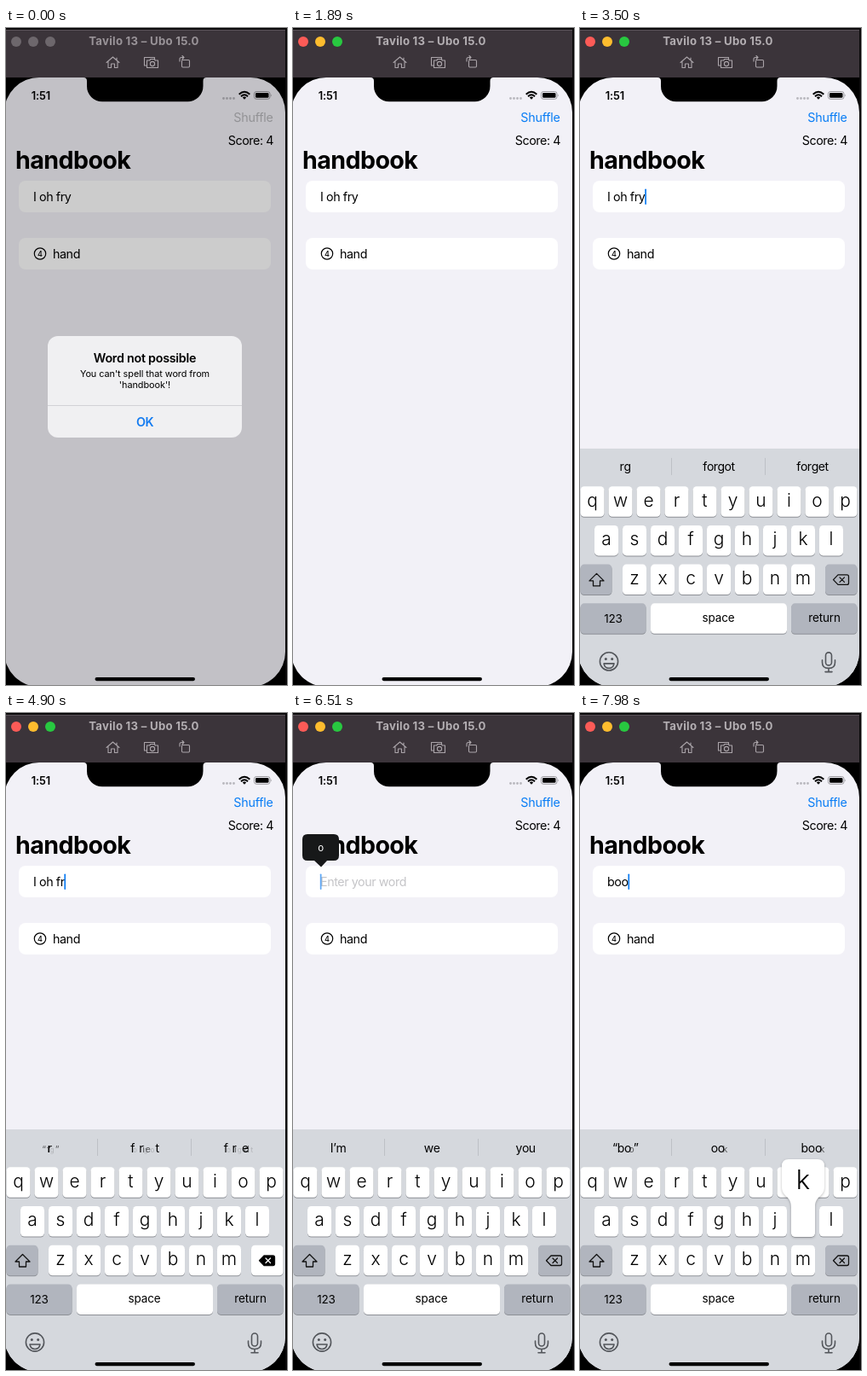
An HTML page that plays this animation: 330 by 770 pixels, repeating every 8 s.

```html
<!DOCTYPE html>
<html lang="en">
<head>
<meta charset="utf-8">
<title>Word game</title>
<style>
html, body { margin: 0; width: 100%; height: 100%; overflow: hidden; background: #0b0a0b; }
svg { display: block; width: 330px; height: 770px; }
text { font-family: Inter, "Liberation Sans", sans-serif; font-size: 14.3px; letter-spacing: -.03em; white-space: pre; }
.mid { text-anchor: middle; }
.end { text-anchor: end; }
.line { fill: none; stroke-linecap: round; stroke-linejoin: round; }
.key { font-size: 21px; font-weight: 300; letter-spacing: 0; }
.note { font-size: 10.9px; letter-spacing: -.006em; }
</style>
</head>
<body>
<svg viewBox="0 0 330 770">
  <defs><clipPath id="screen"><rect x="-2" y="58" width="330" height="714" rx="41"/></clipPath></defs>

  <rect width="330" height="770" fill="#0b0a0b"/>
  <rect y="2" width="328" height="56" fill="#3b343a"/>
  <path d="M0 2.5H328" stroke="#5b545a"/>
  <rect y="58" width="328" height="712"/>
  <g id="lights"><circle cx="12" cy="16" r="6"/><circle cx="32" cy="16" r="6"/><circle cx="52" cy="16" r="6"/></g>
  <text id="caption" class="mid" x="162" y="20" style="font-size:13.2px;font-weight:700;letter-spacing:.02em">Tavilo 13 – Ubo 15.0</text>
  <g class="line" stroke="#aaa4a9" stroke-width="1.1">
    <path d="M118 40.5L125.5 34L133 40.5M120 39.5V46.5H123.5V42H127.5V46.5H131V39.5M130 35V37.5"/>
    <path d="M165 44H162.5V34.5H174.5V36.5M165.5 38H168.5L170 36.5H174L175.5 38H178.5V46.5H165.5Z"/>
    <circle cx="172" cy="42" r="2.6"/>
    <rect x="206.5" y="37.5" width="9" height="8.5" rx="1.2"/>
    <path d="M204 39V36.5Q204 34.5 206 34.5H209M207 32.5L209 34.5L207 36.5"/>
  </g>

  <g clip-path="url(#screen)">
    <rect x="-2" y="58" width="330" height="714" fill="#f2f1f7"/>
    <text x="29.7" y="83.5" style="font-size:12.8px;font-weight:600;letter-spacing:-.01em">1:51</text>
    <g fill="#b9b8be"><circle cx="255.5" cy="82.5" r="1.4"/><circle cx="259.5" cy="82.5" r="1.4"/><circle cx="263.5" cy="82.5" r="1.4"/><circle cx="267.5" cy="82.5" r="1.4"/></g>
    <path d="M273.7 77.8Q280 71.8 286.3 77.8M276 80.2Q280 76.4 284 80.2" fill="none" stroke="#000" stroke-width="2"/>
    <path d="M277.8 81.5Q280 79.7 282.2 81.5L280 83.8Z"/>
    <rect x="291.5" y="74.5" width="18.5" height="8.8" rx="2.6" fill="none" stroke="#99989d"/>
    <rect x="293" y="76" width="15.5" height="5.8" rx="1.4"/>
    <path d="M311.3 77.4Q313 79 311.3 80.6Z" fill="#99989d"/>
    <text id="shuffle" class="end" x="313.7" y="109.5" style="letter-spacing:-.015em">Shuffle</text>
    <text class="end" x="314" y="137">Score: 4</text>
    <text x="11" y="165.3" style="font-size:28.6px;font-weight:700;letter-spacing:-.02em">handbook</text>
    <rect x="15" y="179" width="296" height="37" rx="8" fill="#fff"/>
    <rect x="15" y="246" width="296" height="37" rx="8" fill="#fff"/>
    <text id="entry" x="32" y="203"></text>
    <rect id="caret" y="188.5" width="1.7" height="18.5" rx=".8" fill="#0b7bf2"/>
    <circle cx="40" cy="264.5" r="6.7" fill="none" stroke="#000" stroke-width="1.2"/>
    <text class="mid" x="40" y="267.8" style="font-size:9px;font-weight:500;letter-spacing:0">4</text>
    <text x="55" y="269.8">hand</text>

    <g id="bubble">
      <path d="M17 142H48Q54 142 54 148V167Q54 173 48 173H40L33 180.5L25 173H17Q11 173 11 167V148Q11 142 17 142Z" fill="#171819"/>
      <text class="mid" x="32.5" y="162" fill="#fff" style="font-size:11.5px">o</text>
    </g>

    <g id="keyboard">
      <rect x="-2" width="330" height="290" fill="#d5d8dd"/>
      <path d="M107.5 11V31M217.5 11V31" stroke="#bdc0c6"/>
      <g id="words"></g>
      <g id="keys"></g>
      <g class="line" stroke="#53565b" stroke-width="1.6">
        <circle cx="34" cy="249.5" r="10.6"/>
        <path d="M28 252H40Q39 257.5 34 257.5T28 252Z"/>
        <rect x="288.5" y="239" width="7" height="15" rx="3.5"/>
        <path d="M284.5 248V250.5Q284.5 257.5 292 257.5T299.5 250.5V248M292 257.5V261.5M288 261.7H296"/>
      </g>
      <g fill="#53565b"><circle cx="30.3" cy="246.5" r="1.5"/><circle cx="37.7" cy="246.5" r="1.5"/></g>
      <g id="popup" style="filter:drop-shadow(0 1px 1.5px #0004)"><path fill="#fff"/><text class="mid key" style="font-size:31px"></text></g>
    </g>

    <rect id="dim" x="-2" y="58" width="330" height="714"/>
    <g id="alert">
      <rect x="49" y="361" width="228" height="119" rx="12" fill="#f0f0f2"/>
      <path d="M49 442.5H277" stroke="#d2d2d6"/>
      <text class="mid" x="163" y="392" style="font-weight:600;letter-spacing:-.018em">Word not possible</text>
      <text class="mid note" x="163" y="409">You can't spell that word from</text>
      <text class="mid note" x="163" y="422">'handbook'!</text>
      <text class="mid" x="163" y="466.8" fill="#137bf0" style="font-weight:600">OK</text>
    </g>
    <path d="M91 58A4 4 0 0 1 95 62V68A18 18 0 0 0 113 86.3H213A18 18 0 0 0 231.5 68V62A4 4 0 0 1 235.5 58Z"/>
    <rect x="104.5" y="761" width="117.5" height="4.2" rx="2.1"/>
  </g>
</svg>
<script>
const $ = id => document.getElementById(id);
const clamp = v => Math.min(1, Math.max(0, v));
const ramp = (t, from, to) => clamp((t - from) / (to - from));
const LOOP = 8000, STEP = 70;

const edits = [
  [0, 'I oh fry'], [4760, 'I oh fr'], [5040, 'I oh f'], [5180, 'I oh '], [5320, 'I oh'], [5460, 'I o'],
  [5670, 'I '], [5740, 'I'], [5880, ''], [6930, 'b'], [7210, 'bo'], [7840, 'boo']
];
const suggestions = [
  [0, ['rg', 'forgot', 'forget']],
  [4760, ['“fr”', 'friet', 'fried']],
  [5320, ['', '', '']],
  [5880, ['I’m', 'we', 'you']],
  [6930, ['“b”', 'be', 'but']],
  [7210, ['“bo”', 'oo', 'boo']],
  [7840, ['“boo”', 'ook', 'book']]
];
const presses = [['b', 6790, 6930], ['o', 7140, 7280], ['o', 7700, 7840], ['k', 7910, 8000]];
const lastIndex = (list, t) => list.findLastIndex(item => item[0] <= t);

// Keyboard
const GREY = '#b1b5be', KEY_HEIGHT = 35.5;
const rowTop = row => 44.3 + 45.7 * row;
const keys = {};
const cap = (x, row, w, fill, id = '') =>
  `<rect x="${x}" y="${rowTop(row) + 1}" width="${w}" height="${KEY_HEIGHT}" rx="4.5" fill="#8d9096"/>
   <rect id="${id}" x="${x}" y="${rowTop(row)}" width="${w}" height="${KEY_HEIGHT}" rx="4.5" fill="${fill}"/>`;
const label = (x, y, word) => `<text class="mid" x="${x}" y="${y}" style="font-size:13.5px;letter-spacing:-.01em">${word}</text>`;
let board = '';
[['qwertyuiop', .5], ['asdfghjkl', 17], ['zxcvbnm', 50]].forEach(([letters, left], row) =>
  [...letters].forEach((letter, i) => {
    const x = left + i * 33, y = rowTop(row);
    keys[letter] = { x: x + 14, y };
    board += cap(x, row, 28, '#fff') + `<text class="mid key" x="${x + 14}" y="${y + 23.3}">${letter}</text>`;
  }));
board += cap(.5, 2, 37, GREY) + cap(288, 2, 37.5, GREY, 'eraser') +
  cap(.5, 3, 77, GREY) + cap(83, 3, 160, '#fff') + cap(248, 3, 77.5, GREY) +
  label(39, 204, '123') + label(162.5, 203, 'space') + label(287, 203, 'return') +
  `<g class="line" stroke="#111" stroke-width="1.3">
    <path d="M19.5 146.5L28 155H23.5V161H15.5V155H11Z"/>
    <path id="erase" d="M303 148H313.5Q315.5 148 315.5 150V157.5Q315.5 159.5 313.5 159.5H303L297.5 153.7Z"/>
    <path id="cross" d="M305 151L310.5 156.5M310.5 151L305 156.5"/>
  </g>`;
$('keys').innerHTML = board;

function popupPath({ x, y }) {
  const top = y - 55;
  return `M${x - 25} ${top + 8}q0 -8 8 -8h34q8 0 8 8V${top + 32}` +
    `C${x + 25} ${top + 45} ${x + 14} ${top + 42} ${x + 14} ${top + 56}V${y + 31}q0 5 -5 5h-18q-5 0 -5 -5V${top + 56}` +
    `C${x - 14} ${top + 42} ${x - 25} ${top + 45} ${x - 25} ${top + 32}Z`;
}

// Suggestion words: shared letters slide, the others shrink out or grow in
const SIZE = 14;
const pen = document.createElement('canvas').getContext('2d');
const measure = word => {
  pen.font = `${SIZE}px Inter, "Liberation Sans", sans-serif`;
  return pen.measureText(word).width - .025 * SIZE * word.length;
};
const place = (word, center) => [...word].map((_, i) => center - measure(word) / 2 + measure(word.slice(0, i)));
const glyph = (char, x, shown) => shown <= 0 ? '' :
  `<text x="${x}" y="26.5" opacity="${shown}" style="font-size:${SIZE * (.5 + .5 * shown)}px;letter-spacing:0">${char}</text>`;

function morph(from, to, center, p) {
  const oldX = place(from, center), newX = place(to, center);
  const kept = new Set();
  let next = 0, out = '';
  [...to].forEach((char, i) => {
    const j = from.indexOf(char, next);
    if (j < 0) {
      out += glyph(char, newX[i], ramp(p, 0, .6));
    } else {
      kept.add(j);
      next = j + 1;
      out += glyph(char, oldX[j] + (newX[i] - oldX[j]) * p, 1);
    }
  });
  [...from].forEach((char, j) => { if (!kept.has(j)) out += glyph(char, oldX[j], 1 - ramp(p, 0, .4)); });
  return out;
}

function drawWords(t) {
  const i = lastIndex(suggestions, t);
  const [start, words] = suggestions[i];
  const before = i ? suggestions[i - 1][1] : words;
  const p = words[0] ? ramp(t, start, start + 420) : 1;
  $('words').innerHTML = words.map((word, n) => morph(before[n], word, 53 + 110 * n, p)).join('');
}

function caretOpacity(t) {
  if (t < 3150) return 0;
  if (t < 4760) return 1 - ramp(t, 4060, 4200);
  if (t < 6790) return 1 - ramp(t, 6440, 6650);
  return 1;
}

function draw(t) {
  const focused = t >= 910;
  ['#fc5b57', '#fdbc2e', '#28c840'].forEach((color, i) =>
    $('lights').children[i].setAttribute('fill', focused ? color : '#6d676c'));
  $('caption').setAttribute('fill', focused ? '#b3aeb2' : '#999398');

  const fade = 1 - ramp(t, 1070, 1400);
  $('alert').setAttribute('opacity', fade);
  $('dim').setAttribute('opacity', .2 * fade);
  $('shuffle').setAttribute('fill', t < 1120 ? '#b6b6ba' : '#087df5');

  const entry = $('entry'), text = edits[lastIndex(edits, t)][1];
  entry.textContent = text;
  $('caret').setAttribute('x', 31.8 + (text ? entry.getComputedTextLength() : 0));
  $('caret').setAttribute('opacity', caretOpacity(t));
  if (!text) entry.textContent = 'Enter your word';
  entry.setAttribute('fill', text ? '#000' : '#c4c4c7');
  $('bubble').setAttribute('opacity', t < 6930 ? ramp(t, 5880, 6090) : 0);

  // Critically damped spring
  const u = Math.max(0, t - 3103) * .0151;
  const drop = t < 3150 ? 290 : 282 * (1 + u) * Math.exp(-u);
  $('keyboard').setAttribute('transform', `translate(0 ${488 + drop})`);
  drawWords(t);

  const erasing = (t >= 4760 && t < 5180) || (t >= 5320 && t < 6090);
  $('eraser').setAttribute('fill', erasing ? '#fff' : GREY);
  $('erase').setAttribute('fill', erasing ? '#000' : 'none');
  $('cross').setAttribute('stroke', erasing ? '#fff' : '#111');

  const press = presses.find(([, down, up]) => t >= down && t < up);
  $('popup').setAttribute('visibility', press ? 'visible' : 'hidden');
  if (press) {
    const key = keys[press[0]], [shape, letter] = $('popup').children;
    shape.setAttribute('d', popupPath(key));
    letter.setAttribute('x', key.x);
    letter.setAttribute('y', key.y - 20);
    letter.textContent = press[0];
  }
}

const begin = performance.now();
function tick() {
  const t = (performance.now() - begin) % LOOP;
  draw(Math.floor(t / STEP) * STEP);
  requestAnimationFrame(tick);
}
tick();
</script>
</body>
</html>
```
